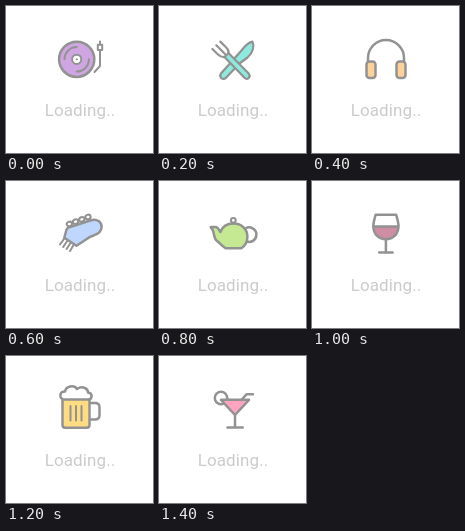
An HTML page that plays this animation: 147x147 px, repeating every 1.6 s.

```html
<!DOCTYPE html>
<html lang="en">
<head>
<meta charset="utf-8">
<title>Loading</title>
<style>
  html, body { margin: 0; width: 100%; height: 100%; overflow: hidden; background: #fff; }
  svg { display: block; width: 100vw; height: 100vh; }
  text { font: 400 17px Roboto, Arial, sans-serif; letter-spacing: .1px; fill: #cbcbcb; }
  .icon {
    fill: none; stroke: #929292; stroke-width: 2.5;
    stroke-linecap: round; stroke-linejoin: round;
    visibility: hidden;
    animation: turn 1600ms step-end infinite;
    animation-delay: calc(var(--i) * 200ms - 1600ms);
  }
  .tint { fill: var(--c); }
  .flat { fill: var(--c); stroke: none; }
  .thin { stroke-width: 2; }
  .white { fill: #fff; }
  @keyframes turn {
    0% { visibility: visible; }
    12.5%, 100% { visibility: hidden; }
  }
</style>
</head>
<body>
<svg viewBox="0 0 147 147">
  <!-- turntable -->
  <g class="icon" style="--i:0; --c:#cfa6e2">
    <circle class="tint" cx="70.7" cy="53.3" r="17.6"/>
    <circle class="white thin" cx="70.7" cy="53.3" r="4.6"/>
    <circle cx="70.7" cy="53.3" r=".6" stroke-width="1"/>
    <path class="thin" d="M58.5 53.3A12.2 12.2 0 0 1 70.7 41.1M82.9 53.3A12.2 12.2 0 0 1 70.7 65.5"/>
    <path class="thin" d="M94 35.5V38.5M91.8 38.7H96.2V44H91.8ZM94 44.5V60L88.5 66"/>
  </g>

  <!-- knife and fork -->
  <g class="icon" style="--i:1; --c:#8eeadf; stroke-width:2.2">
    <path class="tint" d="M93.5 35.7C95.5 40 94 47 88.5 51.5L80.5 57.5L67 71.8Q64.5 74 62.2 72Q60.2 69.6 62.2 67.3L82 45C86 40 90 36.2 93.5 35.7Z"/>
    <path class="tint" d="M65.5 51L69.5 47L89.7 67.6Q91.6 70 89.7 72Q87.6 73.8 85.5 71.8Z"/>
    <path d="M53.4 43L59 48.5Q62 51.4 65.5 51M57.3 39.3L66 48M61.3 35.6L67 41.2Q70 44 69.5 47"/>
  </g>

  <!-- headphones -->
  <g class="icon" style="--i:2; --c:#ffd29a">
    <path d="M56 58V52A18 18 0 0 1 92 52V58"/>
    <rect class="tint" x="54.5" y="55.5" width="9" height="16.5" rx="3"/>
    <rect class="tint" x="84.5" y="55.5" width="9" height="16.5" rx="3"/>
  </g>

  <!-- guitar head -->
  <g class="icon" style="--i:3; --c:#bfd6fd">
    <g class="thin">
      <ellipse cx="63.4" cy="43" rx="2.7" ry="2.2" transform="rotate(-20 63.4 43)"/>
      <ellipse cx="69.6" cy="40.6" rx="2.7" ry="2.2" transform="rotate(-20 69.6 40.6)"/>
      <ellipse cx="75.8" cy="38.3" rx="2.7" ry="2.2" transform="rotate(-20 75.8 38.3)"/>
      <ellipse cx="82" cy="36" rx="2.7" ry="2.2" transform="rotate(-20 82 36)"/>
      <path d="M58.3 57.5L54 63.5M61.5 59.5L57.2 66M64.8 61.5L60.6 68M68 63.3L64 70"/>
    </g>
    <path class="tint" d="M58.3 56.8L60.3 49.2Q61 47 63.2 46.2L85 39.2C91 37.4 95.7 41 95.6 46C95.4 50.8 91.5 53 88.2 54.2C84.5 55.3 82.5 56.2 80 58.5L70.5 64.8Z"/>
  </g>

  <!-- teapot -->
  <g class="icon" style="--i:4; --c:#c5e992">
    <path d="M86.5 47.5C91 44.5 97.4 48 97.4 53.5C97.4 59 92.5 62 87.5 60.5"/>
    <path class="tint" d="M66.5 67.2C62.5 65 60.5 61.5 57.5 59.5C54 56.5 56 50 51.7 46H56C59 46 60.2 48.5 61.3 51C63.5 45.5 68 42.6 74.5 42.6C82.5 42.6 88.4 48 88.4 55.5C88.4 60.5 86 65 82.3 67.2Z"/>
    <circle class="white thin" cx="74.3" cy="39.3" r="2.4"/>
  </g>

  <!-- wine -->
  <g class="icon" style="--i:5; --c:#cf8da2">
    <path class="flat" d="M61.3 45.6H86.5C86 53.5 81 58.2 73.9 58.2C66.8 58.2 61.8 53.5 61.3 45.6Z"/>
    <path d="M63.6 33.8H84.2C85.4 38 86.6 42 86.5 45.6C86 53.5 81 58.2 73.9 58.2C66.8 58.2 61.8 53.5 61.3 45.6C61.2 42 62.4 38 63.6 33.8ZM61.5 45.6H86.3M73.9 58.5V71.3M67.2 71.5H80.6"/>
  </g>

  <!-- beer -->
  <g class="icon" style="--i:6; --c:#ffdc82">
    <path d="M83.5 47H89Q93.5 47 93.5 51.5V59Q93.5 63.5 89 63.5H83.5"/>
    <path class="tint" d="M56.5 41V69Q56.5 71.7 59.2 71.7H80.8Q83.5 71.7 83.5 69V41Z"/>
    <path class="white" d="M58 43.5C53 42.5 53 35.5 59 35.5C60 30 68 28.5 71 33C76 29.5 82 32 82 36.5C87 37 86.5 43.5 82 43.5Z"/>
    <path class="thin" d="M64.5 50V64.5M70 50V64.5M75.5 50V64.5"/>
  </g>

  <!-- cocktail -->
  <g class="icon" style="--i:7; --c:#ffa5c2">
    <circle class="white" cx="62" cy="42" r="6.2"/>
    <path class="tint" d="M62 43.8H90L76 59Z"/>
    <path d="M76 59V71.3M68.5 71.5H83.7M82.3 44L87.7 38.2H94"/>
  </g>

  <text x="38.7" y="110">Loading..</text>
</svg>
</body>
</html>
```
